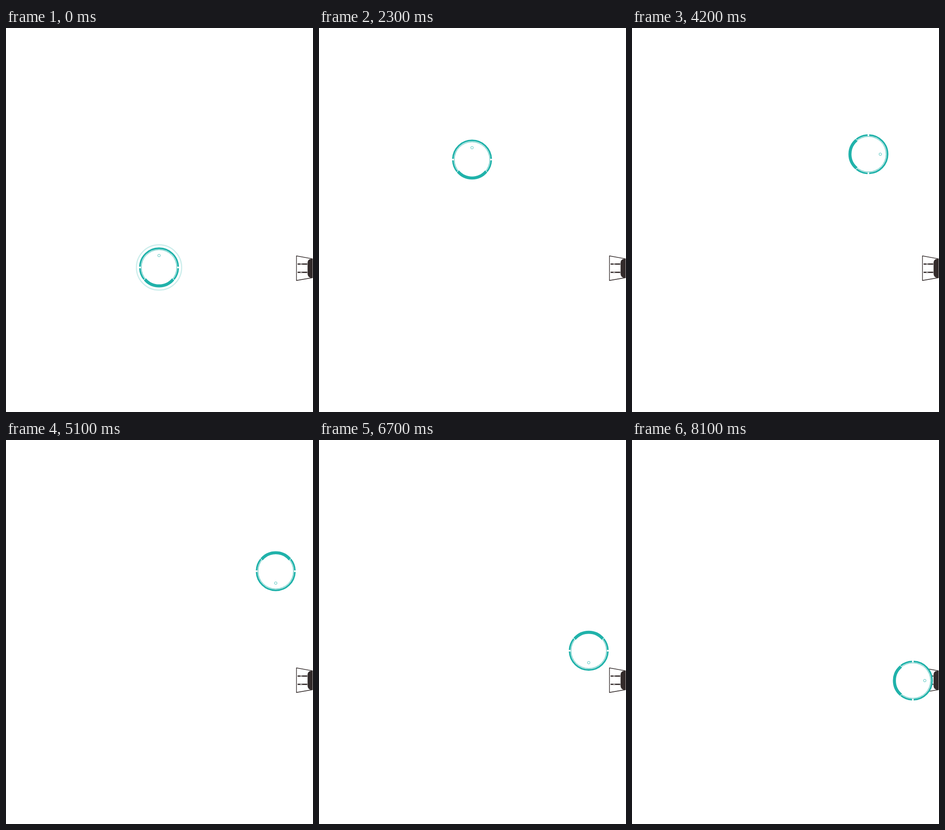
Animation, 669 px wide and 837 px high, one loop 8.2 s. Source, as an HTML page:

```html
<!DOCTYPE html>
<html lang="en">
<head>
<meta charset="utf-8">
<title>Robot vacuum docking</title>
<style>
  html, body { margin: 0; width: 100%; height: 100%; overflow: hidden; background: #fff; }
  svg { display: block; width: 669px; height: 837px; }
</style>
</head>
<body>
<svg viewBox="0 0 669 837">
  <g fill="#332b2b">
    <path d="M633 496.8L667.6 503V544.3L633 550.3Z" fill="none" stroke="#332b2b" stroke-width="1.4"/>
    <path d="M668.2 503H666Q657.2 503.6 657.2 512V535.5Q657.2 543.8 666 544.5H668.2Z"/>
    <g id="contact">
      <rect x="635.5" y="513.2" width="21" height="2.7"/>
      <rect x="641" y="514" width="4.3" height="1" fill="#fff"/>
    </g>
    <use href="#contact" y="18"/>
  </g>
  <circle id="halo" cx="333.5" cy="521.9" fill="none" stroke="#20b2aa" stroke-width="2.5"/>
  <g id="robot" fill="none" stroke="#20b2aa">
    <circle r="43.5" fill="#fff" stroke="none"/>
    <circle r="38.6" stroke-width="0.9"/>
    <path id="shell" stroke-width="3.6"/>
    <path id="bumper" stroke-width="6.6"/>
    <circle cy="-26" r="2.8" stroke-width="0.8"/>
  </g>
</svg>
<script>
const LOOP = 8200, STEP = 100;
const byId = id => document.getElementById(id);
const halo = byId('halo'), robot = byId('robot');

function arc(r, from, to) {
  const point = deg => {
    const a = deg * Math.PI / 180;
    return `${(r * Math.cos(a)).toFixed(2)} ${(r * Math.sin(a)).toFixed(2)}`;
  };
  return `M${point(from)}A${r} ${r} 0 0 1 ${point(to)}`;
}

const gap = 2.3, corner = 38.7;
byId('shell').setAttribute('d',
  arc(41.7, 180 + gap, 360 - gap) + arc(41.7, gap, corner) + arc(41.7, 180 - corner, 180 - gap));
byId('bumper').setAttribute('d', arc(40.2, corner + 1.4, 180 - corner - 1.4));

// Linear progress from 0 to 1 between two times
const ramp = (t, from, to) => Math.min(1, Math.max(0, (t - from) / (to - from)));

function draw(time) {
  const t = Math.floor(time % LOOP / STEP) * STEP;

  // Drive up, right, down, then right into the dock, turning on the spot between
  const x = 333.5 + 254.3 * ramp(t, 2700, 4800) + 24.2 * ramp(t, 7500, 8100);
  const y = 521.9 - 246.8 * ramp(t, 300, 2400) + 249.3 * ramp(t, 5000, 7300);
  const turn = 90 * (ramp(t, 2500, 2700) + ramp(t, 4800, 5000) - ramp(t, 7300, 7500));
  robot.setAttribute('transform', `translate(${x} ${y}) rotate(${turn})`);

  const fade = ramp(t, 0, 300);
  halo.setAttribute('r', 49.3 + 12 * fade);
  halo.setAttribute('opacity', 0.23 * (1 - fade));
}

const start = performance.now();
function tick() {
  draw(performance.now() - start);
  requestAnimationFrame(tick);
}
tick();
</script>
</body>
</html>
```
